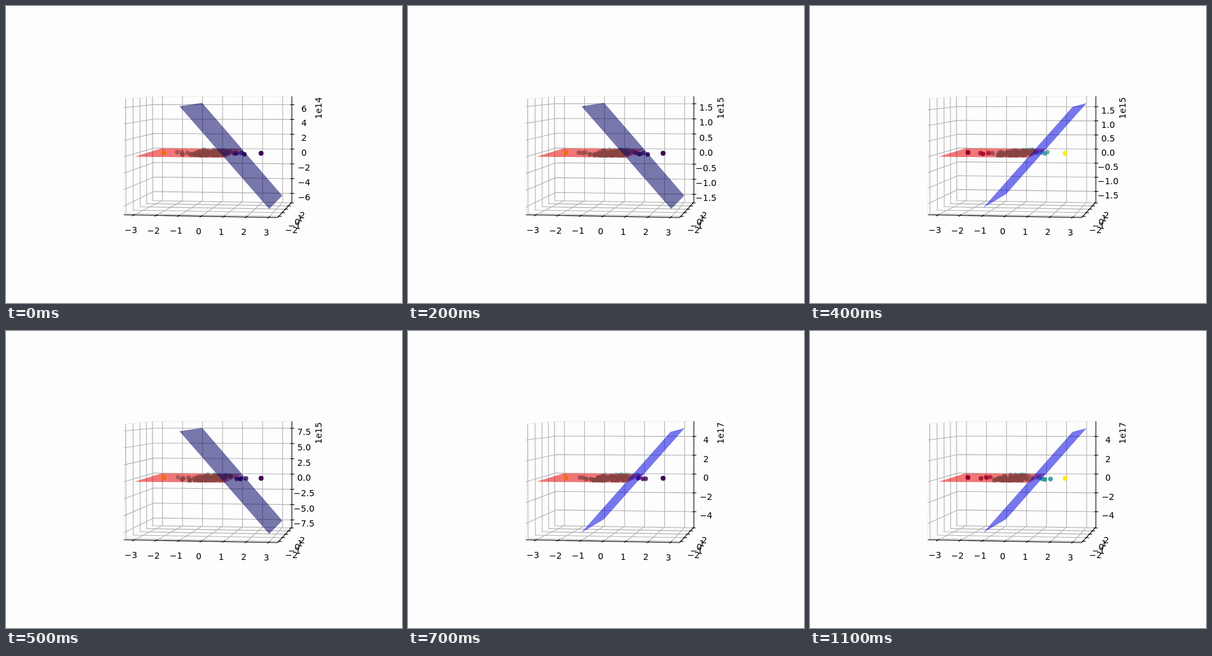
Animation, 640 px wide and 480 px high, one loop 1200 ms. Source, as an HTML page:

```html
<!DOCTYPE html>
<html lang="en">
<head>
<meta charset="utf-8">
<title>Regression planes</title>
<style>
  html, body { margin: 0; width: 100%; height: 100%; overflow: hidden; background: #fdfdfd; }
  svg { display: block; width: 640px; height: 480px; }
  text { font: 13.89px "DejaVu Sans", sans-serif; text-anchor: middle; }
  path { fill: none; stroke-width: 1.11; }
  .pane { stroke: #eee; }
  .grid { stroke: #b0b0b0; }
  .axis { stroke: #000; }
  .pose { visibility: hidden; animation: show 1.2s step-end infinite; }
  @keyframes show {
    0% { visibility: visible; }
    8.3334%, 100% { visibility: hidden; }
  }
</style>
</head>
<body>
<svg id="plot" viewBox="0 0 640 480"></svg>
<script>
const PURPLE = '#440154', TEAL = '#21918c', YELLOW = '#fde725';
const RED = { points: '208,243.6 251.5,230 382,231 354,245.2', fill: 'rgb(230,0,0)' };
const FALLING = { points: '280.3,162 317,156.5 446.5,306.5 425.3,328', fill: 'rgb(0,0,100)' };
const RISING = { points: '280,326 317,304 447,157 424.3,163', fill: 'rgb(0,0,222)' };

// Vertical scales: pixels per tick, value per tick, ticks each side, decimals.
const scale = (px, unit, count, digits) => ({ px, unit, count, digits });
const BY_TWO = scale(23.9, 2, 3, 0);
const HALF_WIDE = scale(24.4, 0.5, 3, 1);
const HALF = scale(22.8, 0.5, 3, 1);
const QUARTER = scale(24.7, 2.5, 3, 1);
const BY_TWO_WIDE = scale(30.4, 2, 2, 0);

// Dots left of lo and right of hi take the end colours.
const WARM = { left: YELLOW, right: PURPLE, lo: 275, hi: 361 };
const COOL = { left: PURPLE, right: YELLOW, lo: 294, hi: 400 };

const pose = (exp, axis, plane, ends) => ({ exp, axis, plane, ends });
const steady = ends => pose(17, BY_TWO_WIDE, RISING, ends);
const rising = exp => pose(exp, HALF, RISING, COOL);

const poses = [
  pose(14, BY_TWO, FALLING, WARM),
  rising(15),
  pose(15, HALF_WIDE, FALLING, WARM),
  rising(15),
  rising(15),
  pose(15, QUARTER, FALLING, WARM),
  rising(16),
  ...[WARM, WARM, COOL, COOL, COOL].map(steady)
];

function random(seed) {
  return () => {
    seed = (Math.imul(seed, 1664525) + 1013904223) >>> 0;
    return seed / 4294967296;
  };
}

const clamp = (v, lo, hi) => Math.min(hi, Math.max(lo, v));
// Moves from near to far, with steps shrinking by perspective.
const recede = (near, far, t) => near + (far - near) * (t + 0.14 * t * (1 - t));

const path = (cls, d) => `<path class="${cls}" d="${d}"/>`;
const label = (x, y, value) =>
  `<text x="${x}" y="${y + 5}">${String(value).replace('-', '\u2212')}</text>`;
const dot = (x, y, fill, alpha, r = 3.7) =>
  `<circle cx="${x.toFixed(1)}" cy="${y.toFixed(1)}" r="${r}" fill="${fill}" fill-opacity="${alpha.toFixed(2)}"/>`;
const polygon = ({ points, fill }) =>
  `<polygon points="${points}" fill="${fill}" fill-opacity=".53"/>`;

function frameBox() {
  let grid = path('pane', 'M190.5 337.5L193 150L238.7 146H462M238.7 146V314L462 317M238.7 314L190.5 337.5');
  let ticks = '', labels = '';
  for (let k = -3; k <= 3; k++) {
    const back = 350 + 32.35 * k, front = 315.5 + 36.4 * k;
    const backY = 315.5 + 0.45 * k, frontY = 339.8 + 0.6 * k;
    grid += path('grid', `M${back} 146V${backY}L${front} ${frontY}`);
    ticks += path('axis', `M${front + 2} ${frontY - 1.3}l-4.6 2.7`);
    labels += label(311.3 + 36.5 * k, 364 + 0.65 * k, k);
  }
  for (let k = -2; k <= 2; k++) {
    const t = (k + 2) / 4;
    const x = recede(194, 237, t), y = recede(335.8, 314.7, t);
    const endX = recede(442, 461.3, t), endY = recede(340, 318.3, t);
    grid += path('grid', `M${x - 0.5} ${150 - 3.6 * t}L${x} ${y}L${endX} ${endY}`);
    ticks += path('axis', `M${endX - 2.5} ${endY}h6`);
    labels += label(recede(461.3, 479, t), recede(362, 338, t), k);
  }
  return grid + path('axis', 'M190.5 337.5L439 342L462 317V146') + ticks + labels;
}

function heightAxis({ axis, exp }) {
  let out = '';
  for (let k = -axis.count; k <= axis.count; k++) {
    const rise = k * axis.px, y = 231.2 - rise;
    out += path('grid', `M190.5 ${243.8 - rise * 1.11}L238.7 ${229.6 - rise * 0.98}L462 ${y}`);
    out += path('axis', `M459.5 ${y}h6.5`);
    out += label(481.7, y + 6, (k * axis.unit).toFixed(axis.digits));
  }
  return out + `<text transform="translate(510 165) rotate(-90)">1e${exp}</text>`;
}

function scatter({ ends }, seed) {
  const rnd = random(seed * 7919 + 31);
  const bell = () => rnd() + rnd() + rnd() - 1.5;
  const color = x => x < ends.lo ? ends.left : x > ends.hi ? ends.right : TEAL;

  const cluster = Array.from({ length: 105 }, () => {
    const depth = clamp(0.48 + bell() * 0.45, 0.2, 0.88);
    const x = 315.5 + 34 * depth + 34 * clamp(bell() * 0.85, -0.75, 0.75);
    return { x, y: 243.5 - 12.5 * depth, depth };
  }).sort((a, b) => b.depth - a.depth);
  let out = cluster.map(c => dot(c.x, c.y, TEAL, 1 - 0.6 * c.depth)).join('');

  // Sparse dots on both sides of the cluster.
  for (let i = 0; i < 4; i++) {
    for (const start of [274, 367]) {
      const x = start + 5.5 * i + 6 * rnd(), y = 236 + 4 * rnd();
      out += dot(x, y, color(x), 0.6 + (y - 236) * 0.08);
    }
  }
  return out + dot(255.3, 236.7, ends.left, 1, 4) + dot(412.3, 238, ends.right, 1, 4);
}

const drawPose = (p, i) =>
  `<g class="pose" style="animation-delay:${i * 100 - 1200}ms">` +
  heightAxis(p) + scatter(p, i + 1) + polygon(RED) + polygon(p.plane) + '</g>';

document.getElementById('plot').innerHTML = frameBox() + poses.map(drawPose).join('');
</script>
</body>
</html>
```
